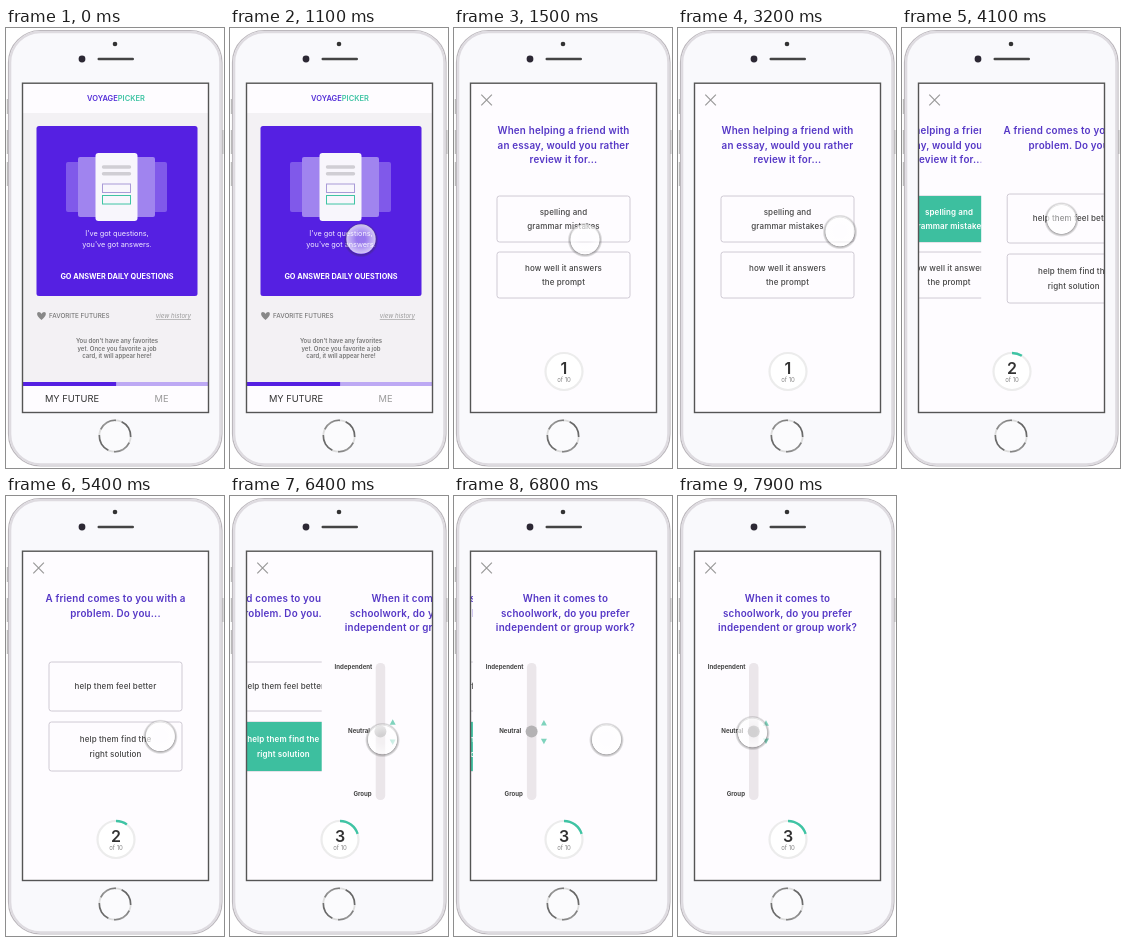
An HTML page that plays this animation: 218 px wide and 440 px high, repeating every 8 s.

```html
<!DOCTYPE html>
<html lang="en">
<head>
<meta charset="utf-8">
<title>Career quiz</title>
<style>
html, body { margin: 0; width: 100%; height: 100%; overflow: hidden; background: #fff; }
svg { display: block; width: 218px; height: 440px; font-family: Inter, "Open Sans", sans-serif; }
text { text-anchor: middle; fill: #444; }
.start { text-anchor: start; }
.end { text-anchor: end; }
.title { font-size: 9.8px; font-weight: 600; letter-spacing: .2px; fill: #5537c6; }
.choice { font-size: 8px; font-weight: 500; letter-spacing: .12px; }
.picked { font-weight: 600; fill: #fff; }
.label { font-size: 6.1px; font-weight: 700; fill: #444; }
.lead { font-size: 7.3px; fill: #f0eaff; }
.empty { font-size: 6px; font-weight: 600; fill: #777; }
.tab { font-size: 9.3px; fill: #333; }
</style>
</head>
<body>
<svg viewBox="0 0 218 440">
  <defs>
    <clipPath id="screen"><rect x="17" y="55" width="186" height="330"/></clipPath>
    <linearGradient id="ring" x2="1" y2=".6">
      <stop stop-color="#555"/><stop offset=".55" stop-color="#999"/><stop offset="1" stop-color="#666"/>
    </linearGradient>
    <radialGradient id="glass">
      <stop offset=".3" stop-color="#fff" stop-opacity=".4"/><stop offset="1" stop-color="#fff" stop-opacity=".75"/>
    </radialGradient>
    <radialGradient id="shade">
      <stop offset=".8" stop-color="#333" stop-opacity="0"/>
      <stop offset=".84" stop-color="#333" stop-opacity=".4"/>
      <stop offset="1" stop-color="#333" stop-opacity="0"/>
    </radialGradient>
  </defs>

  <g id="phone">
    <path d="M1.500 71v15M1.500 102v24M1.500 134v24M216.800 102v24" stroke="#bbb" stroke-width="1.400"/>
    <rect x="2.500" y="2.500" width="213.500" height="435.500" rx="32" fill="#f9f9fc" stroke="#bcb8bd" stroke-width="1.200"/>
    <rect x="4.200" y="4.200" width="210.100" height="432.100" rx="30.300" fill="none" stroke="#dedbe0" stroke-width="2.200"/>
    <circle cx="109" cy="16" r="2.300" fill="#333"/>
    <circle cx="76" cy="31" r="3.400" fill="#2c2834"/>
    <rect x="91.500" y="29.800" width="36.500" height="2.500" rx="1.200" fill="#444"/>
    <circle cx="109" cy="408" r="15.700" fill="#fbfbfd" stroke="#ddd" stroke-width="1.800"/>
    <circle cx="109" cy="408" r="15.700" fill="none" stroke="url(#ring)" stroke-width="1.600"
      pathLength="100" stroke-dasharray="19 6" transform="rotate(-65 109 408)"/>
  </g>

  <g clip-path="url(#screen)">
    <rect x="16" y="54" width="188" height="332" fill="#fefcff"/>
    <g id="pages"></g>
    <path d="M27.300 66.700l10.600 10.600m0-10.600l-10.600 10.600" stroke="#999" stroke-width="1.200"/>
    <g id="counter">
      <circle cx="110" cy="343.500" r="18.500" fill="#fff" stroke="#ececec" stroke-width="2.200"/>
      <circle id="arc" cx="110" cy="343.500" r="18.500" fill="none" stroke="#3fc4a4" stroke-width="2.400"
        pathLength="100" transform="rotate(-90 110 343.500)"/>
      <text id="digit" x="110" y="346" font-size="16" font-weight="600" style="fill:#333"></text>
      <text x="110" y="354" font-size="6" style="fill:#888">of 10</text>
    </g>

    <g id="home">
      <rect x="16" y="54" width="188" height="332" fill="#f3f1f4"/>
      <rect x="16" y="54" width="188" height="31" fill="#fefcff"/>
      <text x="110" y="73" font-size="7.500" font-weight="600" style="fill:#5530d8">VOYAGE<tspan fill="#3fc4a4">PICKER</tspan></text>
      <rect x="30.500" y="98" width="161" height="170" rx="2.500" fill="#5520e2"/>
      <g fill="#8059ea"><rect x="60" y="134" width="20" height="50" rx="2"/><rect x="141" y="134" width="20" height="50" rx="2"/></g>
      <g fill="#a084ef"><rect x="72" y="129" width="22" height="60" rx="2"/><rect x="127" y="129" width="22" height="60" rx="2"/></g>
      <rect x="89.500" y="125" width="42" height="68" rx="3" fill="#f8f6fc"/>
      <path d="M97.500 139h26M97.500 145.800h26" stroke="#d0ced4" stroke-width="3.400" stroke-linecap="round"/>
      <g fill="none"><rect x="96.500" y="156" width="28" height="8.500" stroke="#a99bd8"/><rect x="96.500" y="167.500" width="28" height="8.500" stroke="#3fc4a4"/></g>
      <text class="lead" x="111" y="208">I've got questions,</text>
      <text class="lead" x="111" y="219">you've got answers.</text>
      <text x="111" y="251" font-size="7.300" font-weight="700" style="fill:#fff">GO ANSWER DAILY QUESTIONS</text>
      <path d="M35.500 292C29 287 31 283.500 33.500 284.200Q35 284.500 35.500 286Q36 284.500 37.500 284.200C40 283.500 42 287 35.500 292Z" fill="#888"/>
      <text class="start" x="43" y="290.300" font-size="6.300" font-weight="500" style="fill:#777">FAVORITE FUTURES</text>
      <text class="end" x="185" y="290.300" font-size="6.200" font-style="italic" text-decoration="underline" style="fill:#999">view history</text>
      <text class="empty" x="111" y="315.300">You don't have any favorites</text>
      <text class="empty" x="111" y="322.600">yet. Once you favorite a job</text>
      <text class="empty" x="111" y="329.900">card, it will appear here!</text>
      <rect x="16" y="357" width="188" height="29" fill="#fefcff"/>
      <rect x="16" y="354" width="94.500" height="4" fill="#5520e2"/>
      <rect x="110.500" y="354" width="94" height="4" fill="#bda9f4"/>
      <text class="tab" x="66" y="373.500">MY FUTURE</text>
      <text class="tab" x="155.500" y="373.500" style="fill:#999">ME</text>
    </g>
    <g id="touch">
      <circle cy="1" r="17.500" fill="url(#shade)"/>
      <circle r="14.700" fill="url(#glass)"/>
    </g>
  </g>
  <rect x="16.500" y="55.200" width="186" height="329.300" fill="none" stroke="#555" stroke-width="1.400"/>
</svg>

<script>
const LOOP = 8000, STEP = 100, WIDTH = 187;
const HOME_OUT = 1200;
const PICK = [3750, 5950];    // an answer turns green
const PUSH = [3980, 6300];    // the next page slides in
const COUNT = [3900, 6150];   // the counter moves on
const TOUCH = [               // time, x, y
  [200, 222, 335], [900, 131, 211], [1800, 131, 211], [2400, 177, 245], [2750, 177, 245],
  [3150, 162, 203], [3300, 162, 203], [3700, 159.5, 190.5], [4900, 159.5, 190.5], [5600, 153, 252],
  [6200, 153, 252], [6400, 152.5, 243], [7200, 152.5, 243], [7800, 74.5, 236]
];

const $ = id => document.getElementById(id);
const clamp = v => Math.min(1, Math.max(0, v));
const ease = u => u * u * (3 - 2 * u);
const ramp = (t, start, length) => ease(clamp((t - start) / length));
const slide = (t, start) => t < start ? 0 : 1 - Math.exp((start - t) / 109);

const textLine = (cls, x, y, s) => `<text class="${cls}" x="${x}" y="${y}">${s}</text>`;
const heading = lines => lines.map((s, i) => textLine("title", 109.5, 105.7 + i * 14.8, s)).join("");

function option(y, height, lines, pickId) {
  const first = y + height / 2 + 2.8 - (lines.length - 1) * 7.2;
  const words = cls => lines.map((s, i) => textLine(cls, 109.5, first + i * 14.4, s)).join("");
  const box = paint => `<rect x="43" y="${y}" width="133" height="${height}" rx="2.5" ${paint}/>`;
  const picked = pickId
    ? `<g id="${pickId}">${box('fill="#3dbf9f"')}${words("choice picked")}</g>` : "";
  return box('fill="#fefcff" stroke="#cfcad4"') + words("choice") + picked;
}

const slider = `<rect x="71" y="167" width="9.5" height="137" rx="4.5" fill="#ebe6ea"/>
  <circle cx="75.7" cy="235.500" r="6" fill="#b4b2b4"/>
  <path id="up" d="M85 228.800l3-5.500 3 5.500z" fill="#7fd3bd"/>
  <path id="down" d="M85 243.500l3 5.500 3-5.500z" fill="#7fd3bd"/>`
  + textLine("label end", 67.6, 173.2, "Independent")
  + textLine("label end", 65.2, 237.2, "Neutral")
  + textLine("label end", 67, 300, "Group");

const pages = [
  heading(["When helping a friend with", "an essay, would you rather", "review it for..."])
    + option(168, 46, ["spelling and", "grammar mistakes"], "pick0")
    + option(224, 46, ["how well it answers", "the prompt"]),
  heading(["A friend comes to you with a", "problem. Do you..."])
    + option(166, 49, ["help them feel better"])
    + option(226, 49, ["help them find the", "right solution"], "pick1"),
  heading(["When it comes to", "schoolwork, do you prefer", "independent or group work?"]) + slider
];
$("pages").innerHTML = pages.map((body, i) =>
  `<g id="page${i}"><rect x="17" y="54" width="${WIDTH}" height="332" fill="#fefcff"/>${body}</g>`).join("");

function touchAt(t) {
  const next = TOUCH.findIndex(k => k[0] > t);
  if (next < 1) return TOUCH[next ? TOUCH.length - 1 : 0].slice(1);
  const [t0, x0, y0] = TOUCH[next - 1], [t1, x1, y1] = TOUCH[next];
  const u = ramp(t, t0, t1 - t0);
  return [x0 + (x1 - x0) * u, y0 + (y1 - y0) * u];
}

const move = (id, x, y = 0) => $(id).setAttribute("transform", `translate(${x} ${y})`);

function draw(now) {
  const t = Math.floor(now % LOOP / STEP) * STEP;
  const [a, b] = PUSH.map(start => slide(t, start));
  // the page left behind moves at half speed
  move("page0", -WIDTH / 2 * a);
  move("page1", WIDTH * (1 - a) - WIDTH / 2 * b);
  move("page2", WIDTH * (1 - b));

  PICK.forEach((start, i) => $("pick" + i).setAttribute("opacity", ramp(t, start, 150)));
  $("home").setAttribute("opacity", 1 - ramp(t, HOME_OUT, 250));

  $("digit").textContent = 1 + COUNT.filter(start => t >= start).length;
  const done = COUNT.reduce((sum, start) => sum + 10 * ramp(t, start, 250), 0);
  $("arc").setAttribute("stroke-dasharray", `${done} 100`);
  $("arc").setAttribute("visibility", done ? "visible" : "hidden");

  const bob = 1 - Math.cos((t - 6400) / 1000 * Math.PI);
  move("up", 0, bob);
  move("down", 0, -bob);
  move("touch", ...touchAt(t));
}

function tick() {
  draw(performance.now());
  requestAnimationFrame(tick);
}
tick();
</script>
</body>
</html>
```
